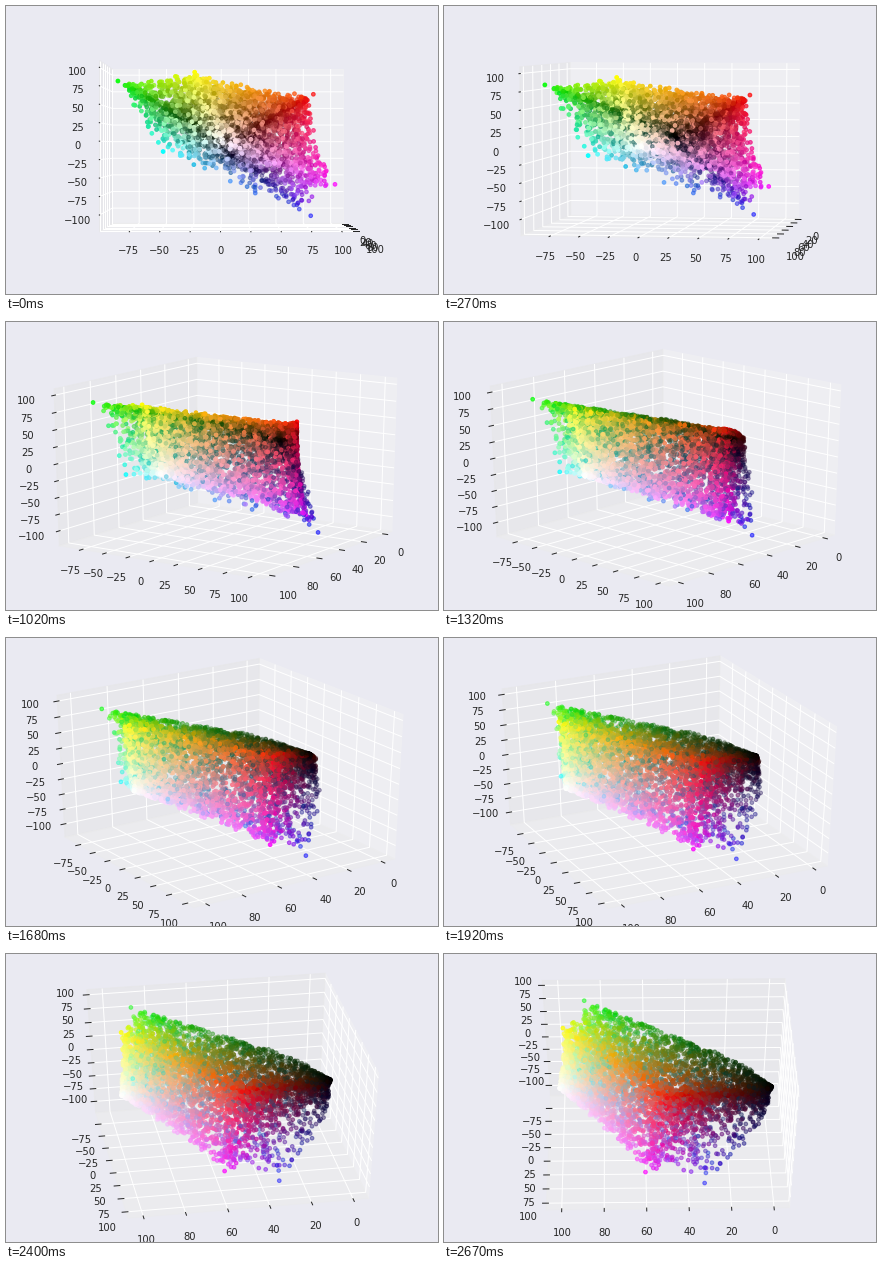
These frames come from a looping animation (432 px wide and 288 px high, 2700 ms). A matplotlib script:

```python
import itertools

import matplotlib.pyplot as plt
import numpy as np
from matplotlib.animation import FuncAnimation
from matplotlib.collections import LineCollection, PolyCollection

WIDTH, HEIGHT, DPI = 432, 288, 72
FRAMES, INTERVAL = 90, 30
POINTS = 5000

VIEW_LOW, VIEW_SPAN = 0.095, 0.185   # visible window of the projected plane
CAMERA = 10.0                        # camera distance in box sizes
DELTA = 1 / 12
EDGE = 0.5 + DELTA / 4               # half size of the box with its padding
LABEL_EDGE = EDGE + DELTA
INK = "0.15"
BACKGROUND = "#EAEAF2"


def sample_colors(rng, count):
    """Warm, contrasty colours: channels share a brightness and pile up at 0 and 1."""
    brightness = rng.normal(0, 1.9, (count, 1))
    level = brightness + rng.normal(0, 1.4, (count, 3)) + [0.8, 0.0, -0.6]
    return 1 / (1 + np.exp(-level))


def rgb_to_lab(rgb):
    linear = np.where(rgb > 0.04045, ((rgb + 0.055) / 1.055) ** 2.4, rgb / 12.92)
    to_xyz = np.array([[0.412453, 0.357580, 0.180423],
                       [0.212671, 0.715160, 0.072169],
                       [0.019334, 0.119193, 0.950227]])
    xyz = linear @ to_xyz.T / [0.95047, 1.0, 1.08883]
    f = np.where(xyz > 0.008856, np.cbrt(xyz), 7.787 * xyz + 16 / 116)
    return np.column_stack([116 * f[:, 1] - 16,
                            500 * (f[:, 0] - f[:, 1]),
                            200 * (f[:, 1] - f[:, 2])])


def project(points, azim, elev):
    """Return pixel positions and depths of points in the unit box."""
    a, e = np.radians([azim, elev])
    toward = [np.cos(e) * np.cos(a), np.cos(e) * np.sin(a), np.sin(e)]
    right = [-np.sin(a), np.cos(a), 0]
    up = [-np.sin(e) * np.cos(a), -np.sin(e) * np.sin(a), np.cos(e)]
    points = np.asarray(points, float)
    depth = CAMERA - points @ toward
    plane = np.stack([points @ right, points @ up], axis=-1) / depth[..., None]
    return (plane + VIEW_LOW) / VIEW_SPAN * [WIDTH, HEIGHT], depth


# Random colours plus the corners of the RGB cube, placed in Lab space
rng = np.random.default_rng(7)
corners = np.array(list(itertools.product([0, 1], repeat=3)), float)
rgb = np.vstack([sample_colors(rng, POINTS), corners])
rgb = rgb[rng.permutation(len(rgb))]
lab = rgb_to_lab(rgb)
low, high = lab.min(axis=0), lab.max(axis=0)
center, span = (low + high) / 2, (high - low) * 1.1
cloud = (lab - center) / span

# Each axis: tick values, edge signs and the direction of its tick marks
AXES = [(range(0, 101, 20), (0, 1, -1), 1),
        (range(-75, 101, 25), (1, 0, -1), 0),
        (range(-100, 101, 25), (1, -1, 0), 0)]

grid_lines, tick_marks, label_spots, label_texts = [], [], [], []
for axis, (values, signs, tick_dir) in enumerate(AXES):
    for value in values:
        place = (value - center[axis]) / span[axis]

        back = np.full(3, -EDGE)
        back[axis] = place
        ends = []
        for step in (1, 2):
            end = back.copy()
            end[(axis + step) % 3] = EDGE
            ends.append(end)
        grid_lines.append([ends[0], back, ends[1]])

        edge = EDGE * np.array(signs, float)
        edge[axis] = place
        offset = np.zeros(3)
        offset[tick_dir] = DELTA
        tick_marks.append([edge - 0.1 * offset, edge + 0.2 * offset])

        spot = LABEL_EDGE * np.array(signs, float)
        spot[axis] = place
        label_spots.append(spot)
        label_texts.append(str(value).replace("-", "\u2212"))

# The three back walls
panes = []
for axis in range(3):
    square = np.full((4, 3), -EDGE)
    square[:, (axis + 1) % 3] = [-EDGE, EDGE, EDGE, -EDGE]
    square[:, (axis + 2) % 3] = [-EDGE, -EDGE, EDGE, EDGE]
    panes.append(square)
pane_colors = [(shade, shade, shade, 0.5) for shade in (0.95, 0.90, 0.925)]

plt.rcParams["font.family"] = "DejaVu Sans"
fig = plt.figure(figsize=(WIDTH / DPI, HEIGHT / DPI), dpi=DPI, facecolor=BACKGROUND)
ax = fig.add_axes([0, 0, 1, 1])
ax.set_xlim(0, WIDTH)
ax.set_ylim(0, HEIGHT)
ax.axis("off")

walls = ax.add_collection(
    PolyCollection([], facecolors=pane_colors, edgecolors=pane_colors,
                   linewidths=1, zorder=1), autolim=False)
grid = ax.add_collection(
    LineCollection([], colors="white", linewidths=1, zorder=2), autolim=False)
ticks = ax.add_collection(
    LineCollection([], colors=INK, linewidths=1, capstyle="projecting", zorder=3),
    autolim=False)
labels = [ax.text(0, 0, text, size=10, color=INK, ha="center", va="top", zorder=4)
          for text in label_texts]
dots = ax.scatter(cloud[:, 0], cloud[:, 1], s=14, c=rgb, linewidths=1,
                  edgecolors="face", zorder=5)


def draw(frame):
    view = frame, frame / 2
    walls.set_verts(project(panes, *view)[0])
    grid.set_segments(project(grid_lines, *view)[0])
    ticks.set_segments(project(tick_marks, *view)[0])
    for label, spot in zip(labels, project(label_spots, *view)[0]):
        label.set_position(spot)

    # Far dots fade
    places, depth = project(cloud, *view)
    far = -1 / depth
    far = (far - far.min()) / (far.max() - far.min())
    dots.set_offsets(places)
    dots.set_facecolors(np.column_stack([rgb, 1 - 0.7 * far]))
    return [walls, grid, ticks, dots, *labels]


anim = FuncAnimation(fig, draw, frames=FRAMES, interval=INTERVAL,
                     repeat=True, repeat_delay=0, blit=False)
plt.show()
```
